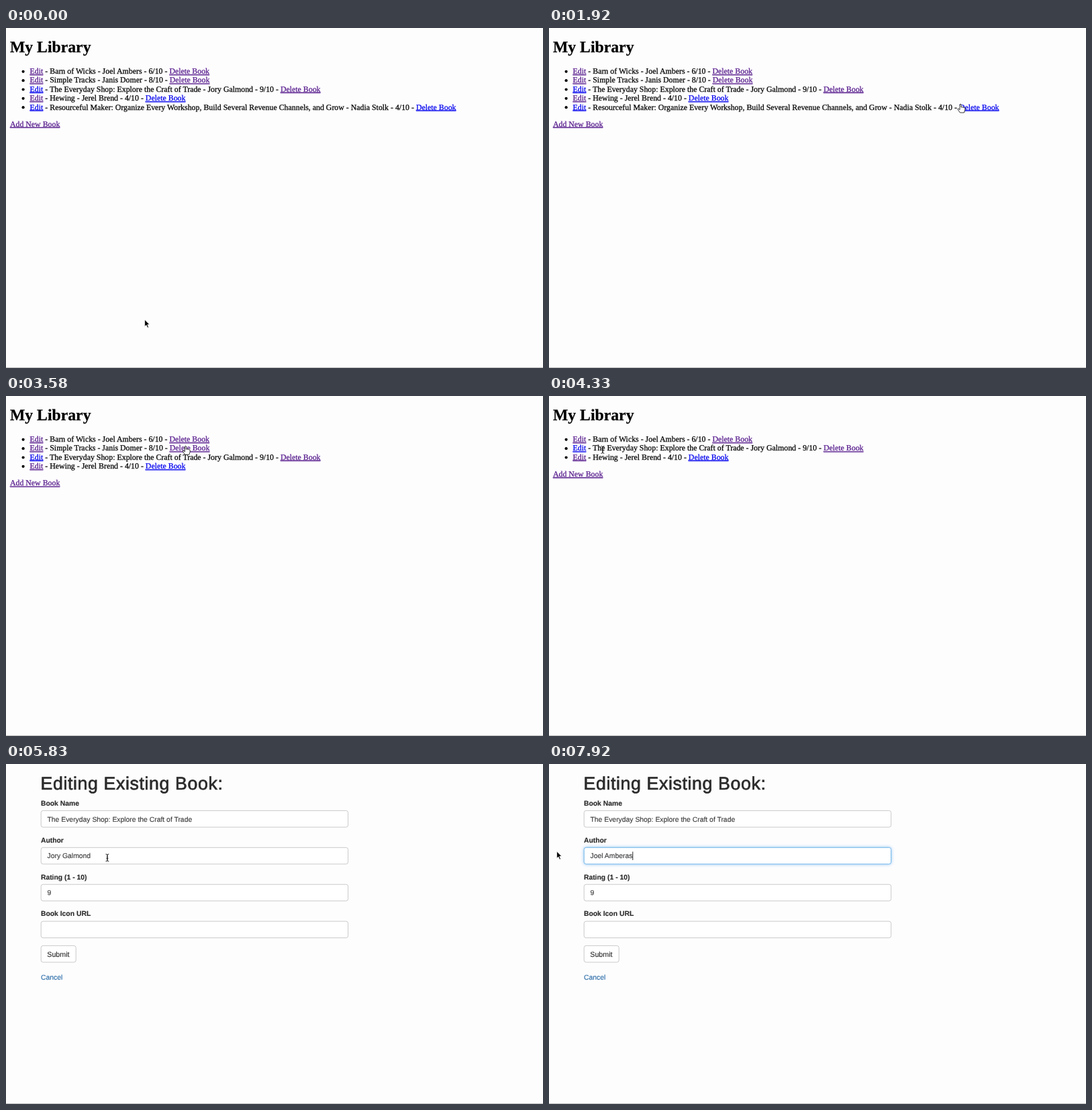
Animation of 800 by 506 pixels, one loop 8 s. Source, as an HTML page:

```html
<!DOCTYPE html>
<html lang="en">
<head>
<meta charset="utf-8">
<title>My Library</title>
<style>
  html, body { margin: 0; width: 100%; height: 100%; overflow: hidden; background: #fefdfe; }
  svg { display: block; width: 800px; height: 506px; }
  text { white-space: pre; text-rendering: geometricPrecision; }
  text, tspan { fill: currentColor; stroke: currentColor; }
  #list text { font: 11.87px "Liberation Serif", Times, serif; color: #000; stroke-width: .25px; }
  #list .title { font-size: 23.74px; font-weight: bold; }
  .new, .seen { text-decoration: underline; }
  #list .new { color: #00e; }
  #list .seen { color: #551a8b; }
  #form text { font: 10.39px "Liberation Sans", Helvetica, sans-serif; color: #3c3c3c; stroke-width: .15px; }
  #form .title { font-size: 26.7px; letter-spacing: .63px; color: #2b2b2b; stroke-width: .7px; }
  #form .label { font-weight: bold; color: #2b2b2b; }
  #form .button { font-size: 10.7px; color: #2b2b2b; }
  #form .cancel { color: #2a6ca8; }
  .box { fill: #fff; stroke: #c4c4c4; stroke-width: .9px; }
  .focus { stroke: #66afe9; filter: drop-shadow(0 0 2.5px rgba(102, 175, 233, .7)); }
  #popup { filter: drop-shadow(0 1px 1.5px rgba(0, 0, 0, .35)); fill: #212123; }
  #popup text { font: 500 9.7px Inter, sans-serif; color: #f4f4f4; stroke: none; }
</style>
</head>
<body>
<svg viewBox="0 0 800 506">
  <g id="list"></g>
  <g id="form">
    <text class="title" x="51.5" y="38">Editing Existing Book:</text>
    <g id="fields"></g>
    <rect class="box" x="52.2" y="270.4" width="52" height="24.6" rx="3"/>
    <text class="button" x="61.3" y="286.5">Submit</text>
    <text class="cancel" x="52" y="321.3">Cancel</text>
    <rect id="selection" y="130.5" height="12.5" fill="#b4d5fe"/>
    <text id="author" x="61.5" y="140.4"></text>
    <rect id="caret" y="130.5" width=".9" height="12.5" fill="#111"/>
    <g id="popup"></g>
  </g>
  <rect y="505" width="800" height="1" fill="#bdbdbd"/>
  <path id="cursor" stroke-linejoin="round"/>
</svg>
<script>
const LOOP = 8000, FPS = 12;
const REMOVE_LAST = 2580, REMOVE_SECOND = 3750, OPEN_FORM = 4750;
const FOCUS = 5910, TYPE = 6660, LEFT = 61.5;
const ROW_TOP = 68.1, ROW_STEP = 13.35;
const TYPED = 'Joel Amberas';

// title, author, rating, edit link class, delete link class, removal time
const books = [
  ['Barn of Wicks', 'Joel Ambers', 6, 'seen', 'seen', LOOP],
  ['Simple Tracks', 'Janis Domer', 8, 'seen', 'seen', REMOVE_SECOND],
  ['The Everyday Shop: Explore the Craft of Trade', 'Jory Galmond', 9, 'new', 'seen', LOOP],
  ['Hewing', 'Jerel Brend', 4, 'seen', 'new', LOOP],
  ['Resourceful Maker: Organize Every Workshop, Build Several Revenue Channels, and Grow',
    'Nadia Stolk', 4, 'new', 'new', REMOVE_LAST]
];
const edited = books[2];
const suggestions = [3, 1, 0, 2].map(i => books[i][1]);

// time, x, y, pointer shape from then on
const path = [
  [0, 206.6, 434, 'arrow'], [420, 340, 325, 'arrow'], [830, 528, 190, 'arrow'],
  [1083, 552.7, 158.8, 'arrow'], [1670, 617, 134, 'arrow'], [1910, 613, 113, 'hand'],
  [REMOVE_LAST, 611.6, 112, 'arrow'], [2667, 611.6, 112, 'arrow'], [3080, 420, 92, 'arrow'],
  [3330, 300, 80, 'beam'], [3500, 268, 74, 'hand'], [REMOVE_SECOND, 266, 75, 'beam'],
  [3900, 262, 77, 'beam'], [4170, 122, 80, 'beam'], [4333, 80, 80, 'beam'],
  [4490, 46, 75, 'hand'], [OPEN_FORM, 45, 75, 'arrow'], [5080, 44, 76, 'arrow'],
  [5250, 58, 86, 'beam'], [5500, 104, 114, 'beam'], [5830, 151, 139.5, 'beam'],
  [FOCUS, 150, 139, 'beam'], [6250, 6, 137, 'beam'], [TYPE, 6, 137, 'none'],
  [7910, 11.6, 130, 'arrow'], [LOOP, 11.6, 130, 'arrow']
];
const shapes = {
  arrow: ['M0 0V10.4L2.4 8.2L4.1 12.2L5.9 11.4L4.2 7.5H7.4Z', '#000', '#fff', .8],
  beam: ['M-2.4-5.4Q0-5.4 0-4V4Q0 5.4-2.4 5.4M2.4-5.4Q0-5.4 0-4V4Q0 5.4 2.4 5.4M-1.4.9H1.4', 'none', '#222', 1],
  hand: ['M-1 .8Q0-.6 1 .8V5Q2 3.9 3 5Q4 4.2 5 5.4Q6.4 4.8 6.8 6.4V9L5.4 13H-.6L-4 8.2Q-4.2 6.6-2.6 7.2L-1 8.6Z', '#fff', '#000', .8],
  none: ['', 'none', 'none', 0]
};

const $ = id => document.getElementById(id);
const set = (el, attrs) => Object.entries(attrs).forEach(([k, v]) => el.setAttribute(k, v));
const show = (el, on) => { el.style.display = on ? '' : 'none'; };

function drawList(t) {
  const rows = books.filter(b => t < b[5]).map(([title, author, rating, edit, del], i) => {
    const y = ROW_TOP + i * ROW_STEP;
    return `<circle cx="25.6" cy="${y - 3.3}" r="2.1"/><text x="35.6" y="${y}"><tspan class="${edit}">Edit</tspan>` +
      ` - ${title} - ${author} - ${rating}/10 - <tspan class="${del}">Delete Book</tspan></text>`;
  });
  const addY = ROW_TOP + (rows.length - 1) * ROW_STEP + 25.2;
  $('list').innerHTML = '<text class="title" x="5.9" y="36">My Library</text>' + rows.join('') +
    `<text class="seen" x="5.9" y="${addY}">Add New Book</text>`;
}

function drawFields(focused) {
  const fields = [['Book Name', edited[0]], ['Author', ''], ['Rating (1 - 10)', edited[2]], ['Book Icon URL', '']];
  $('fields').innerHTML = fields.map(([label, value], i) => {
    const y = 69.4 + i * 54.9;
    return `<text class="label" x="51.9" y="${y - 7.7}">${label}</text>` +
      `<rect class="box ${focused && i === 1 ? 'focus' : ''}" x="52.2" y="${y}" width="457.4" height="24.6" rx="3"/>` +
      `<text x="${LEFT}" y="${y + 16.1}">${value}</text>`;
  }).join('');
}

function drawPopup(names) {
  const popup = $('popup');
  show(popup, names.length);
  if (!names.length) return;
  popup.innerHTML = `<path d="M134.5 156.5L141 150L147.5 156.5Z"/><rect x="125.3" y="156" height="${names.length * 26.75 + 5.8}" rx="2.5"/>` +
    names.map((n, i) => `<text x="134.6" y="${175.8 + i * 26.75}">${n}</text>`).join('');
  const widths = [...popup.querySelectorAll('text')].map(e => e.getComputedTextLength());
  popup.querySelector('rect').setAttribute('width', Math.max(...widths) + 25);
}

function drawForm(t, pointerX) {
  const typing = t >= TYPE, focused = t >= FOCUS;
  const count = Math.floor((t - TYPE) * FPS / 1000) + 1;
  const value = typing ? TYPED.slice(0, count) : edited[1];
  drawFields(focused);
  $('author').textContent = value;
  const end = LEFT + $('author').getComputedTextLength();
  const start = Math.min(end, Math.max(LEFT, pointerX));
  const selected = focused && !typing && start < end;
  show($('selection'), selected);
  set($('selection'), { x: start, width: end - start });
  show($('caret'), focused && !selected);
  set($('caret'), { x: end });
  drawPopup(typing ? suggestions.filter(n => n.startsWith(value)) : []);
}

function pointerAt(t) {
  const i = path.findLastIndex(p => p[0] <= t);
  const a = path[i], b = path[i + 1] || a;
  const k = b === a ? 0 : (t - a[0]) / (b[0] - a[0]);
  return { x: a[1] + (b[1] - a[1]) * k, y: a[2] + (b[2] - a[2]) * k, kind: a[3] };
}

function draw(t) {
  const { x, y, kind } = pointerAt(t);
  const [d, fill, stroke, width] = shapes[kind];
  const onForm = t >= OPEN_FORM;
  show($('list'), !onForm);
  show($('form'), onForm);
  onForm ? drawForm(t, x) : drawList(t);
  set($('cursor'), { d, fill, stroke, 'stroke-width': width, transform: `translate(${x} ${y})` });
}

let last = -1;
function tick() {
  const step = Math.floor((performance.now() % LOOP + 4) * FPS / 1000) % (LOOP * FPS / 1000);
  if (step !== last) draw((last = step) * 1000 / FPS);
  requestAnimationFrame(tick);
}
tick();
</script>
</body>
</html>
```
